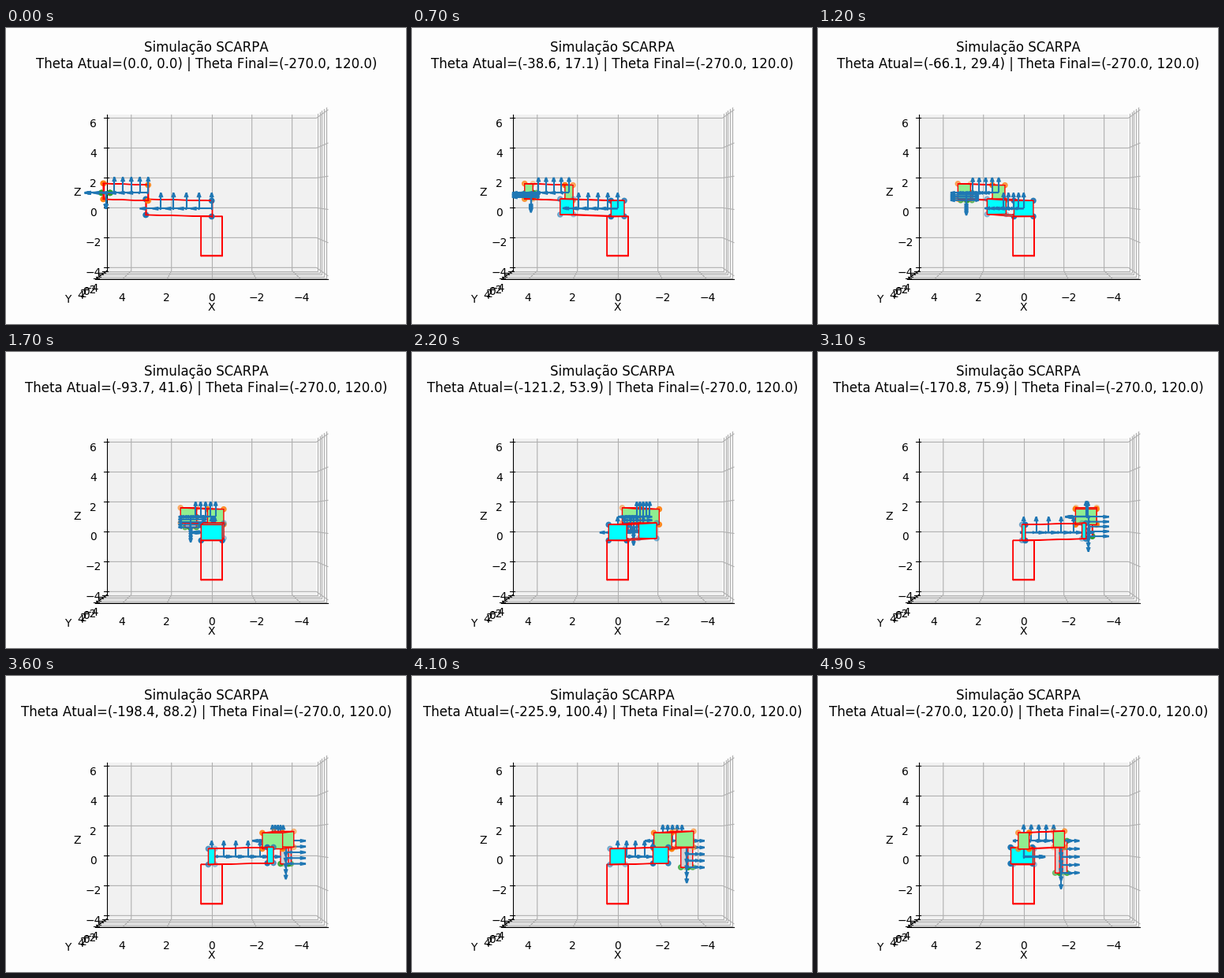
Animation, 507 px wide and 376 px high, one loop 7900 ms. Source, as a matplotlib script:

```python
import numpy as np
import matplotlib.pyplot as plt
from matplotlib.animation import FuncAnimation
from matplotlib.collections import LineCollection, PolyCollection
from matplotlib.colors import to_rgba

W, H, DPI = 507, 376, 100
STEPS, FRAMES, INTERVAL = 49, 79, 100
GOAL = (-270, 120)
DROP = 2.0

RANGE, DIST = 10, 10
DELTA = RANGE / 12
E = RANGE / 2 + DELTA / 4    # half length of an axis with its margin
ZLO, ZHI = 1 - E, 1 + E
CX, CY = 260.7, 209.4        # screen position of the view centre
SX, SZ = 26.811, 19.978      # pixels per unit at y = 0
TICK_PAD, LABEL_PAD = 0.738, 1.604
UP = np.array([0.0, 0.0, 1.0])
TURN = np.radians(15)

plt.rcParams["text.kerning_factor"] = 6
fig = plt.figure(figsize=(W / DPI, H / DPI), dpi=DPI, facecolor="#fdfdfd")
ax = fig.add_axes([0, 0, 1, 1])
ax.set_xlim(0, W)
ax.set_ylim(H, 0)
ax.axis("off")


def project(p):
    """Perspective view along the y axis; x grows to the left."""
    p = np.asarray(p, float)
    s = DIST / (DIST - p[..., 1] / RANGE)
    return np.stack([CX - SX * s * p[..., 0], CY - SZ * s * (p[..., 2] - 1)], -1)


def line(*pts, color="#b0b0b0", z=2):
    xy = project(pts)
    ax.plot(xy[:, 0], xy[:, 1], color=color, lw=0.8, zorder=z)


def pane(grey, *pts):
    ax.fill(*project(pts).T, color=str(grey), alpha=0.5, lw=0, zorder=1)


def label(point, text, va="top"):
    x, y = project(point)
    text = str(text).replace("-", "\u2212")
    ax.text(x, y, text, fontsize=10, ha="center", va=va, zorder=4)


def draw_axes():
    pane(0.95, (-E, -E, ZLO), (-E, E, ZLO), (-E, E, ZHI), (-E, -E, ZHI))
    pane(0.90, (-E, -E, ZLO), (E, -E, ZLO), (E, -E, ZHI), (-E, -E, ZHI))
    pane(0.925, (-E, -E, ZLO), (E, -E, ZLO), (E, E, ZLO), (-E, E, ZLO))

    outer, inner = E + 0.2 * DELTA, E - 0.1 * DELTA
    far, low = E + TICK_PAD, ZLO - TICK_PAD
    for v in range(-4, 5, 2):
        line((v, E, ZLO), (v, -E, ZLO), (v, -E, ZHI))
        line((E, v, ZLO), (-E, v, ZLO), (-E, v, ZHI))
        line((outer, v, ZLO), (inner, v, ZLO), color="k", z=3)
        label((v, far, low), v)
        label((far, v, low), v)
    for v in range(-4, 7, 2):
        line((E, -E, v), (-E, -E, v), (-E, E, v))
        line((outer, -E, v), (inner, -E, v), color="k", z=3)
        label((far, -far, v), v)

    line((E, E, ZLO), (-E, E, ZLO), color="k", z=3)
    line((E, -E, ZLO), (E, E, ZLO), color="k", z=3)
    line((E, -E, ZLO), (E, -E, ZHI), color="k", z=3)
    far, low = E + LABEL_PAD, ZLO - LABEL_PAD
    label((0, far, low), "X", "center")
    label((far, 0, low), "Y", "center")
    label((far, -far, 1), "Z", "center")


def heading(deg):
    """Forward and sideways unit vectors of a joint."""
    c, s = np.cos(np.radians(deg)), np.sin(np.radians(deg))
    return np.array([c, s, 0.0]), np.array([-s, c, 0.0])


def corners(start, end, e1, e2, half):
    ring = half * np.array([-e1 - e2, -e1 + e2, e1 + e2, e1 - e2])
    return np.concatenate([start + ring, end + ring])


def box(pts, color):
    """Two end caps and one pair of sides, far faces first."""
    faces = pts[[[0, 1, 2, 3], [4, 5, 6, 7], [0, 1, 5, 4], [2, 3, 7, 6]]]
    faces = faces[np.argsort(faces[..., 1].mean(1), kind="stable")]
    art = PolyCollection(project(faces), facecolors=color, edgecolors="r", linewidths=1)
    return pts[:, 1].max(), art


def dots(pts, color):
    pts = pts[np.argsort(pts[:, 1], kind="stable")]
    y = pts[:, 1]
    alpha = 0.3 + 0.7 * (y - y[0]) / (y[-1] - y[0])
    xy = project(pts)
    return y[-1], ax.scatter(xy[:, 0], xy[:, 1], s=20, c=[to_rgba(color, a) for a in alpha])


def arrow(p, d):
    """Shaft and two head strokes."""
    flat = np.hypot(d[0], d[1])
    n = np.array([d[1], -d[0], 0]) / flat if flat > 1e-9 else np.array([0.0, 1, 0])
    side = np.cross(n, d) * np.sin(TURN)
    tip = p + d
    heads = [(tip, tip - 0.3 * (d * np.cos(TURN) + k * side)) for k in (-1, 1)]
    return [(p, tip)] + heads


def arrows(origins, dirs):
    return [seg for d in dirs for p in origins for seg in arrow(p, d)]


def quiver(segs):
    segs = np.array(segs)
    art = LineCollection(project(segs), colors="C0", linewidths=1.5)
    return segs[..., 1].max(), art


def link(start, deg, length, face, dot):
    fwd, side = heading(deg)
    end = start + length * fwd
    pts = corners(start, end + 0.1, UP, side, 0.5)
    origins = [start + fwd * length * i / 5 for i in range(5)]
    return end, [dots(pts, dot), box(pts, face)], arrows(origins, (fwd, side, UP))


def slider(start, deg, depth):
    fwd, side = heading(deg)
    pts = corners(start, start - depth * UP, fwd, side, 0.2)
    origins = [start - UP * depth * i / 4 for i in range(5)]
    return [dots(pts, "C2"), box(pts, "lightgray")], arrows(origins, (fwd, -side, -UP))


def pedestal():
    x, y = heading(0)
    return box(corners(-0.5 * UP, -3 * UP, x, y, 0.5), "white")


draw_axes()
title = ax.text(254, 50.83, "", fontsize=12, ha="center", va="baseline")
moving = []


def update(i):
    while moving:
        moving.pop().remove()
    k = min(i, STEPS)
    t1, t2 = (g * k / STEPS for g in GOAL)
    title.set_text(
        "Simulação SCARPA\n"
        f"Theta Atual=({t1:.1f}, {t2:.1f}) | "
        f"Theta Final=({GOAL[0]:.1f}, {GOAL[1]:.1f})"
    )
    elbow, arm1, segs1 = link(np.zeros(3), t1, 3, "cyan", "C0")
    wrist, arm2, segs2 = link(elbow + UP, t1 + t2, 2, "lightgreen", "C1")
    tool, segs3 = slider(wrist, t1 + t2, DROP * k / STEPS)
    parts = [pedestal()] + arm1 + arm2 + tool + [quiver(segs1 + segs2 + segs3)]

    # Parts whose nearest point is closest to the viewer come last.
    for z, (_, art) in enumerate(sorted(parts, key=lambda p: round(p[0], 6))):
        art.set_zorder(10 + z)
        if art.axes is None:
            ax.add_collection(art, autolim=False)
        moving.append(art)
    return moving + [title]


anim = FuncAnimation(fig, update, frames=FRAMES, init_func=lambda: [],
                     interval=INTERVAL, repeat=True, repeat_delay=0, blit=False)
plt.show()
```
